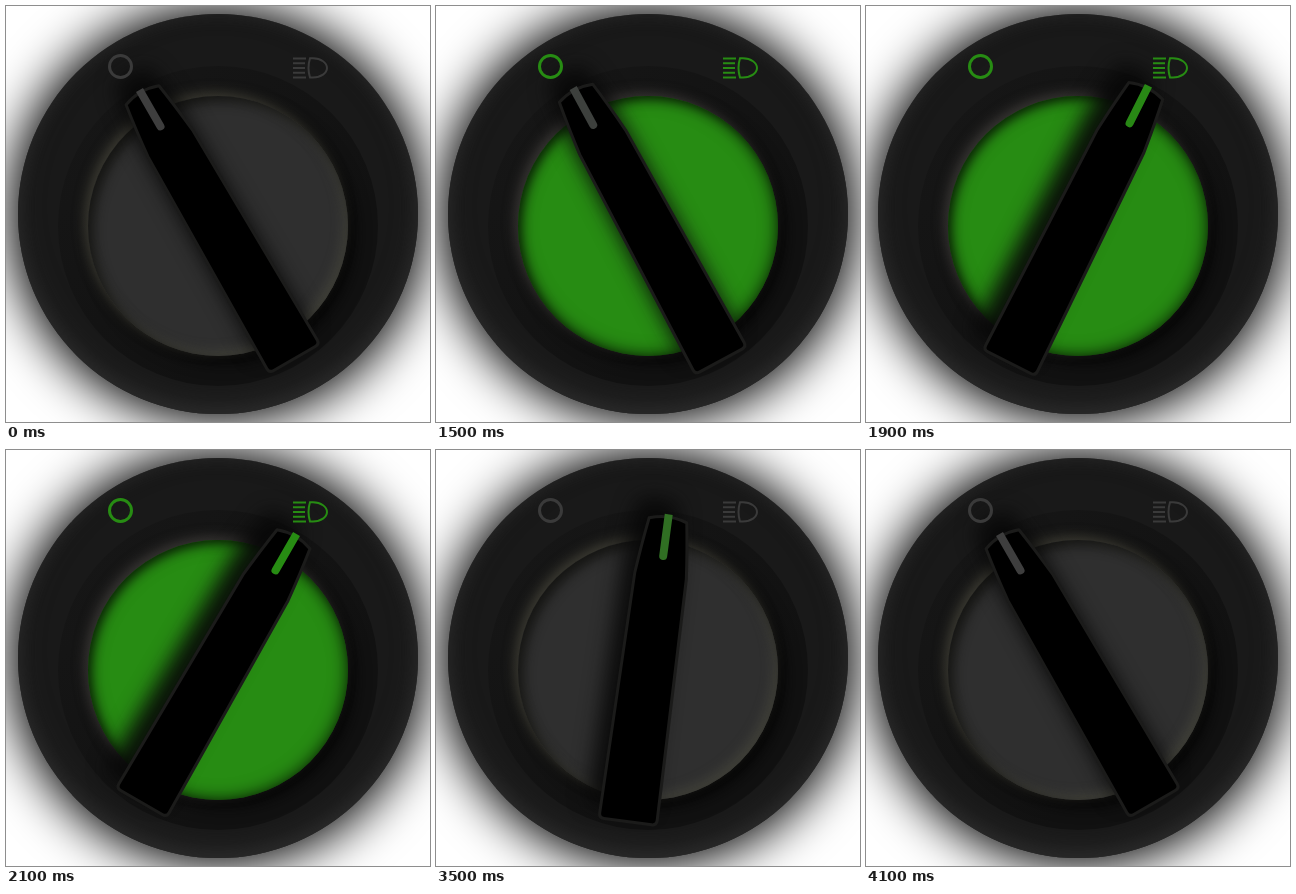
Animation of 424x416 px, one loop 4.2 s. Source, as an HTML page:

```html
<!DOCTYPE html>
<html lang="en">
<head>
<meta charset="utf-8">
<title>Headlight switch</title>
<style>
  html, body { margin: 0; width: 100%; height: 100%; overflow: hidden; background: #fff; }
  #stage { position: relative; width: 424px; height: 416px; overflow: hidden; --lit: #3a3a3a; }
  #stage.on { --lit: #278c13; }

  .disc, .recess, .face { position: absolute; border-radius: 50%; }
  .disc {
    left: 12px; top: 8px; width: 400px; height: 400px;
    background: #191919;
    box-shadow: 0 0 50px 8px #000, inset 0 -8px 24px #2b2b2b, inset 0 0 14px #232323;
  }
  .recess {
    left: 52px; top: 60px; width: 320px; height: 320px;
    background: linear-gradient(135deg, #171717, #111 70%);
  }
  .face {
    left: 82px; top: 90px; width: 260px; height: 260px;
    background: #2f2f2f;
    box-shadow: -4px -4px 12px #3a3931, 7px 7px 15px #060606,
                inset 5px 5px 12px #141412, inset -4px -4px 12px #44443c;
  }
  .on .face {
    background: #278c13;
    box-shadow: -4px -4px 12px #363432, 7px 7px 15px #060606,
                inset 0 0 18px rgba(0, 0, 0, .75), inset 3px 3px 10px rgba(0, 0, 0, .5);
  }

  svg { position: absolute; inset: 0; }
  .icons { fill: none; stroke: var(--lit); stroke-width: 2; }
  .shade { filter: drop-shadow(-10px -17px 10px rgba(8, 8, 8, .92)); }
  .grip { fill: #000; stroke: #1b1b1a; stroke-width: 3; stroke-linejoin: round; }
</style>
</head>
<body>
<div id="stage">
  <div class="disc"></div>
  <div class="recess"></div>
  <div class="face"></div>
  <svg width="424" height="416" viewBox="0 0 424 416">
    <g class="shade">
      <g class="knob">
        <path class="grip" d="M-19-151Q0-158 19-151Q23-125 26-95L29 148Q29 153 24 153H-24Q-29 153-29 148L-26-95Q-23-125-19-151Z"/>
        <path id="mark" d="M-4-157H4V-115A4 4 0 0 1-4-115Z"/>
      </g>
    </g>
    <g class="icons">
      <circle cx="114.5" cy="60.5" r="11" stroke-width="3"/>
      <path d="M287 52.5H300M287 57.2H299M287 62H299M287 66.7H299M287 71.4H300"/>
      <path d="M304 52.3H307C315 52.3 321 57 321 62S315 71.5 307 71.5H304Q301 62 304 52.3Z"/>
    </g>
  </svg>
</div>
<script>
  const LOOP = 4200, STEP = 100;
  const LIGHT_ON = 1400, LIGHT_OFF = 3300;
  const GREY = [62, 62, 62], GREEN = [39, 140, 19];
  const stage = document.getElementById('stage');
  const knob = document.querySelector('.knob');
  const mark = document.getElementById('mark');

  const bezier = (a, b, u) => 3 * a * u * (1 - u) ** 2 + 3 * b * u * u * (1 - u) + u ** 3;

  // CSS "ease": cubic-bezier(.25, .1, .25, 1)
  function ease(x) {
    if (x <= 0) return 0;
    if (x >= 1) return 1;
    let low = 0, high = 1;
    for (let i = 0; i < 24; i++) {
      const mid = (low + high) / 2;
      if (bezier(.25, .25, mid) < x) low = mid; else high = mid;
    }
    return bezier(.1, 1, low);
  }

  function draw(now) {
    // The motion advances ten times a second.
    const t = Math.floor((now % LOOP) / STEP) * STEP;
    const turn = ease((t - 1475) / 600) - ease((t - 3336) / 700);
    const color = GREY.map((c, i) => Math.round(c + (GREEN[i] - c) * turn));
    stage.classList.toggle('on', t >= LIGHT_ON && t < LIGHT_OFF);
    knob.setAttribute('transform', `translate(212 220) rotate(${-30 + 60 * turn})`);
    mark.setAttribute('fill', `rgb(${color})`);
  }

  let start;
  function tick(now) {
    start ??= now;
    draw(now - start);
    requestAnimationFrame(tick);
  }
  draw(0);
  requestAnimationFrame(tick);
</script>
</body>
</html>
```
